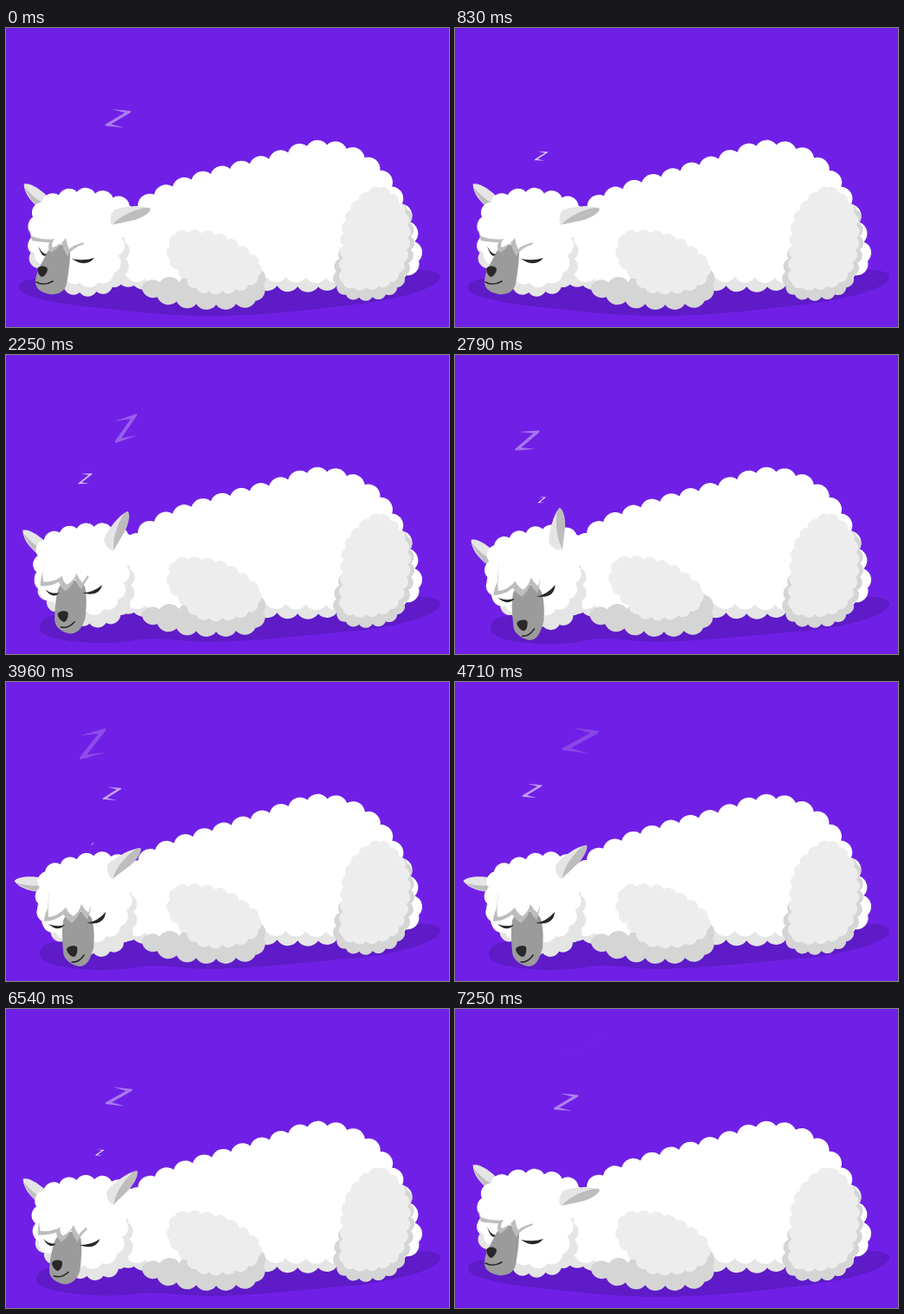
Recreate the animation shown at these times as an HTML page. Size 511 by 346 pixels, loop 7290 ms.

```html
<!DOCTYPE html>
<html lang="en">
<head>
<meta charset="utf-8">
<title>Sleeping alpaca</title>
<style>
  html, body { margin: 0; width: 100%; height: 100%; overflow: hidden; background: #7020e6; }
  svg { display: block; width: 100vw; height: 100vh; }
</style>
</head>
<body>
<svg id="stage" viewBox="0 0 511 346"></svg>
<script>
const LOOP = 7290, LIFE = 1.8;
const INK = '#282828', LIGHT = '#ededed', DARK = '#d5d5d5', EDGE = '#e5e5e5', SHADE = '#bdbdbd';
const stage = document.getElementById('stage');

function add(tag, attrs, parent = stage) {
  const el = document.createElementNS('http://www.w3.org/2000/svg', tag);
  for (const name in attrs) el.setAttribute(name, attrs[name]);
  return parent.appendChild(el);
}

const points = s => s.split(' ').map(p => p.split(',').map(Number));
const lerp = (a, b, k) => a + (b - a) * k;

// Eased 0 to 1 between two times
function ramp(t, from, to) {
  const p = Math.min(1, Math.max(0, (t - from) / (to - from)));
  return p * p * (3 - 2 * p);
}
const pulse = (t, from, to) => ramp(t, from, (from + to) / 2) - ramp(t, (from + to) / 2, to);

// Smooth closed curve through a few points
function curve(pts, steps = 10) {
  const at = i => pts[(i + pts.length) % pts.length];
  return pts.flatMap((_, i) => Array.from({ length: steps }, (_, s) => {
    const u = s / steps;
    return [0, 1].map(c => {
      const [a, b, d, e] = [-1, 0, 1, 2].map(o => at(i + o)[c]);
      return b + u * ((d - a) + u * ((2 * a - 5 * b + 4 * d - e) + u * (3 * b - a - 3 * d + e))) / 2;
    });
  }));
}

// Wool outline: equal outward bumps along the curve
function wool(pts, bumps) {
  const line = curve(pts);
  line.push(line[0]);
  const len = [0];
  for (let i = 1; i < line.length; i++) {
    len.push(len[i - 1] + Math.hypot(line[i][0] - line[i - 1][0], line[i][1] - line[i - 1][1]));
  }
  const total = len[len.length - 1];
  let d = `M${line[0]}`, last = line[0], i = 1;
  for (let n = 1; n <= bumps; n++) {
    const goal = total * n / bumps;
    while (i < len.length - 1 && len[i] < goal) i++;
    const u = (goal - len[i - 1]) / (len[i] - len[i - 1]);
    const next = [0, 1].map(c => lerp(line[i - 1][c], line[i][c], u));
    const r = 0.6 * Math.hypot(next[0] - last[0], next[1] - last[1]);
    d += `A${r},${r} 0 0 1 ${next}`;
    last = next;
  }
  return d + 'Z';
}

// Blend two paths that share the same commands
function blend(a, b) {
  const num = /-?[\d.]+/g;
  const from = a.match(num).map(Number), to = b.match(num).map(Number);
  return k => {
    let i = 0;
    return a.replace(num, () => { const v = lerp(from[i], to[i], k); i++; return v.toFixed(2); });
  };
}

function blendWool(a, b, bumps) {
  const from = points(a), to = points(b);
  return k => wool(from.map((p, i) => p.map((v, c) => lerp(v, to[i][c], k))), bumps);
}

function morph(shape, attrs) {
  const el = add('path', attrs);
  return k => el.setAttribute('d', shape(k));
}

const still = (pts, bumps, fill) => add('path', { d: wool(points(pts), bumps), fill });

function ear(light, dark) {
  const g = add('g', {});
  add('path', { d: light, fill: EDGE }, g);
  add('path', { d: dark, fill: SHADE }, g);
  return (x, y, angle) => g.setAttribute('transform', `translate(${x} ${y}) rotate(${angle})`);
}

add('rect', { width: 511, height: 346, fill: '#7020e6' });

const shadow = morph(blend(
  'M15,299 C16,290 40,288 70,290 L470,280 C490,279 503,283 501,289 C497,302 455,313 410,319 C360,325 300,333 235,333 C205,333 180,331 155,329 C120,325 90,323 60,318 C30,312 14,308 15,299Z',
  'M39,316 C39,305 48,300 70,300 L470,280 C490,279 503,283 501,289 C497,302 455,313 410,319 C360,322 300,331 235,332 C205,332 180,326 155,329 C130,334 110,334 85,332 C55,329 39,324 39,316Z'
), { fill: '#5e1bc7' });

// Body
still('140,270 200,250 300,250 385,270 380,297 303,298 200,292 145,298 128,288', 24, EDGE);
const body = points('152,206 196,182 247,166 309,150 350,136 387,138 421,155 443,180 464,218 471,245 476,270 455,288 380,289 250,287 145,288 125,255');
const bodyPath = add('path', { fill: '#fff' });

function breathe(b) {
  bodyPath.setAttribute('d', wool(body.map(([x, y]) => {
    if (y > 210 || x > 305) return [x, y];
    const w = b * Math.sin((x - 145) / 160 * Math.PI);
    return [x + 3 * w, y + 4 * w];
  }), 37));
}

// Legs
still('400,240 455,203 467,240 463,276 447,304 412,312 385,304 382,278', 20, DARK);
still('431,185 455,205 463,230 460,265 446,292 416,300 389,295 389,265 391,228 404,203', 22, LIGHT);
const shin = still('200,294 285,277 297,296 290,315 250,320 205,318 160,306 164,294', 14, DARK);
const thigh = still('195,239 229,238 259,247 291,272 288,291 266,302 230,304 213,296 206,285 191,272 189,255', 18, LIGHT);

// Head: first pose faces left, second pose faces forward
const leftEar = ear('M0,-7 C12,-9 26,-7 33,0 C30,6 14,10 0,9Z', 'M0,-7 C12,-8 24,-5 30,-2 C18,-3 8,-2 0,1Z');
const head = [
  morph(blendWool(
    '125,235 137,258 134,290 110,304 72,303 32,272 40,235',
    '132,235 146,260 142,294 112,314 70,303 44,275 48,245', 16), { fill: EDGE }),
  morph(blendWool(
    '31,240 36,206 77,190 122,196 147,212 132,245 124,284 95,296 70,287 34,262',
    '39,258 43,222 73,208 110,201 145,212 141,248 132,282 105,297 66,293 43,278', 17), { fill: '#fff' })
];
const muzzle = [
  morph(blend(
    'M46,262 C52,250 70,246 74,258 C74,270 72,285 70,296 C68,306 58,309 50,308 C40,306 33,301 34,292 C36,278 42,272 46,262Z',
    'M66,276 C70,262 94,262 99,274 C102,285 102,295 101,308 C98,318 95,328 86,329 C78,329 66,322 66,312 C65,300 64,288 66,276Z'
  ), { fill: '#9b9b9b' }),
  morph(blend(
    'M36,279 C38,274 47,275 48,279 C48,283 44,288 41,288 C39,287 36,283 36,279Z',
    'M70,309 C71,305 81,304 82,307 C83,312 81,318 78,318 C75,318 70,313 70,309Z'
  ), { fill: INK }),
  morph(blend('M35,294 Q44,299 54,293', 'M76,324 Q84,325 90,316'),
    { fill: 'none', stroke: INK, 'stroke-width': 1.6, 'stroke-linecap': 'round' })
];
head.push(
  morph(blend('M76,267 Q90,270 102,266 Q92,278 76,267Z', 'M93,279 Q106,277 115,266 Q114,282 93,279Z'), { fill: INK }),
  morph(blend('M37,252 Q41,261 47,262 Q42,268 37,252Z', 'M49,280 Q58,284 68,281 Q60,290 49,280Z'), { fill: INK }),
  morph(blend(
    'M27,235 Q29,244 30,246 Q42,248 50,248 Q47,256 52,260 Q62,254 64,247 Q66,257 71,264 Q75,255 90,250 L80,225 L40,222Z',
    'M48,262 Q44,270 44,277 Q58,276 66,269 Q70,275 76,279 Q84,272 86,264 Q89,270 94,275 Q97,268 98,260 L90,240 L50,242Z'
  ), { fill: SHADE }),
  morph(blend(
    'M27,230 Q29,239 30,241 Q44,246 56,244 Q51,251 54,254 Q64,250 69,243 Q70,250 73,256 Q77,251 90,248 L85,220 L40,218Z',
    'M49,256 Q48,265 49,272 Q60,271 69,261 Q72,268 78,271 Q85,265 87,257 Q90,263 95,267 Q97,262 99,255 L92,238 L50,240Z'
  ), { fill: '#fff' })
);
const rightEar = ear(
  'M0,4 C-2,-2 3,-10 8,-12 C22,-12 40,-8 48,-1 C47,2 35,6 25,6 L0,4Z',
  'M1,4 C10,-2 25,-5 40,-4 Q47,-3 48,-1 C48,3 35,7 25,6Z');

// Each Z: birth (s), drift (px/s), turn (deg/s)
const zs = points('.32,-1,5 .97,30,-15 1.68,-15,-4 2.52,0,-11 3.22,30,5 3.93,-14,6 4.72,29,-11 5.46,28,6 6.25,28,5')
  .map(([birth, drift, turn]) => {
    const el = add('path', {
      d: 'M-.27,-.34 L.48,-.34 L.48,-.28 L-.25,.25 L.27,.34 L-.48,.34 L-.48,.28 L.25,-.25Z',
      fill: '#fff'
    });
    return t => {
      const age = ((t - birth * 1000 + LOOP) % LOOP) / 1000;
      el.setAttribute('opacity', Math.max(0, 1 - age / LIFE));
      el.setAttribute('transform',
        `translate(${100 + drift * age} ${190 - 82 * age}) rotate(${turn * age}) scale(${2.5 + 25.5 * age})`);
    };
  });

function draw(t) {
  const alert = ramp(t, 1700, 2600) - ramp(t, 2950, 3500);
  const turn = ramp(t, 1700, 2600) - ramp(t, 6150, 6930);
  const k = turn + 0.04 * alert;
  const chew = 0.07 * pulse(t, 60, 720);
  shadow(1 - (1 - turn) ** 2.6 + 0.1 * alert);
  head.forEach(part => part(k));
  muzzle.forEach(part => part(k + chew));

  const droop = ramp(t, 3000, 3500) - ramp(t, 6150, 6500);
  leftEar(lerp(44, 42, k), lerp(204, 236, k), -135 - 18 * pulse(t, 850, 1450) - 35 * droop);
  rightEar(lerp(121, 120, k), lerp(224, 225, k),
    -17 - 25 * turn - 46 * alert - 16 * pulse(t, 4600, 5150) - 20 * pulse(t, 6150, 6930));

  const step = -8 * (ramp(t, 2290, 2700) - ramp(t, 2900, 3500));
  thigh.setAttribute('transform', `translate(${step} ${step / 8})`);
  shin.setAttribute('transform', `translate(${step / 6} 0)`);

  breathe((1 - Math.cos(t / LOOP * 6 * Math.PI)) / 2);
  zs.forEach(drawZ => drawZ(t));
}

const start = performance.now();
function tick() {
  draw((performance.now() - start) % LOOP);
  requestAnimationFrame(tick);
}
tick();
</script>
</body>
</html>
```
